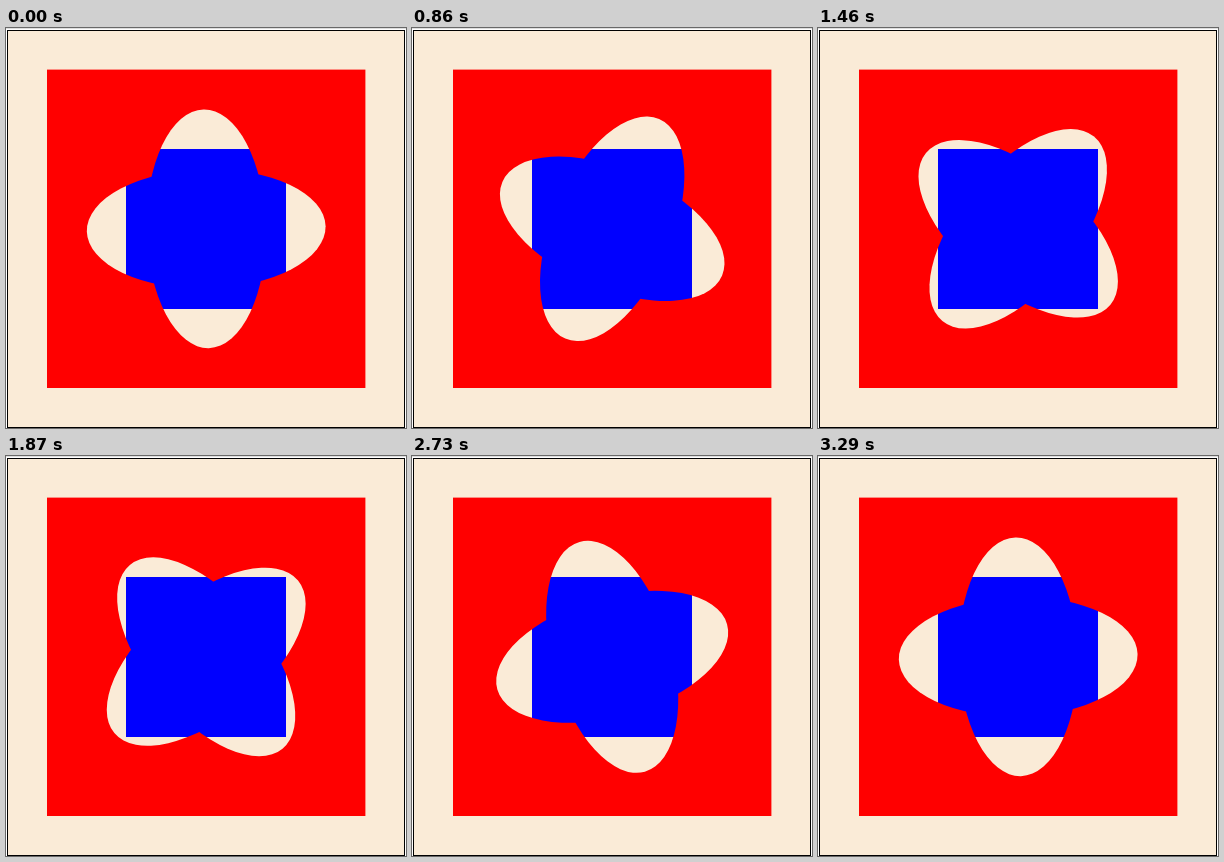
Recreate the animation shown at these times as an HTML page. Size 400x400 px, loop 3320 ms.

```html
<!DOCTYPE html>
<html lang="en">
<head>
<meta charset="utf-8">
<title>Rotating ellipses</title>
<style>
  html, body { margin: 0; width: 100%; height: 100%; overflow: hidden; background: #fff; }
  svg { display: block; width: 100vw; height: 100vh; }
</style>
</head>
<body>
<svg viewBox="0 0 400 400">
  <mask id="petals" maskUnits="userSpaceOnUse" x="0" y="0" width="400" height="400">
    <g id="rotor" fill="#fff">
      <ellipse rx="119.4" ry="59.7"/>
      <ellipse rx="59.7" ry="119.4"/>
    </g>
  </mask>
  <rect width="400" height="1" fill="#ddd"/>
  <rect x="1.5" y="2.5" width="397" height="397" fill="#faebd7" stroke="#000"/>
  <rect x="41" y="41.6" width="318.4" height="318.4" fill="#f00"/>
  <g mask="url(#petals)">
    <rect x="41" y="41.6" width="318.4" height="318.4" fill="#faebd7"/>
    <rect x="120" y="121" width="160" height="160" fill="#00f"/>
  </g>
</svg>
<script>
  const LOOP = 3320;
  // [time in ms, angle in degrees]: a quarter turn at a slightly uneven pace
  const keys = [[0, -1.3], [450, 11.2], [860, 23.1], [1460, 39.4],
                [2280, 61.1], [2730, 74.1], [3290, 88.7], [LOOP, 88.7]];
  const rotor = document.getElementById('rotor');

  function angleAt(t) {
    const i = keys.findIndex(([time]) => time > t);
    const [t0, a0] = keys[i - 1], [t1, a1] = keys[i];
    return a0 + (a1 - a0) * (t - t0) / (t1 - t0);
  }

  function draw() {
    const angle = angleAt(performance.now() % LOOP);
    rotor.setAttribute('transform', `translate(200.2 200.8) rotate(${angle})`);
    requestAnimationFrame(draw);
  }
  draw();
</script>
</body>
</html>
```
